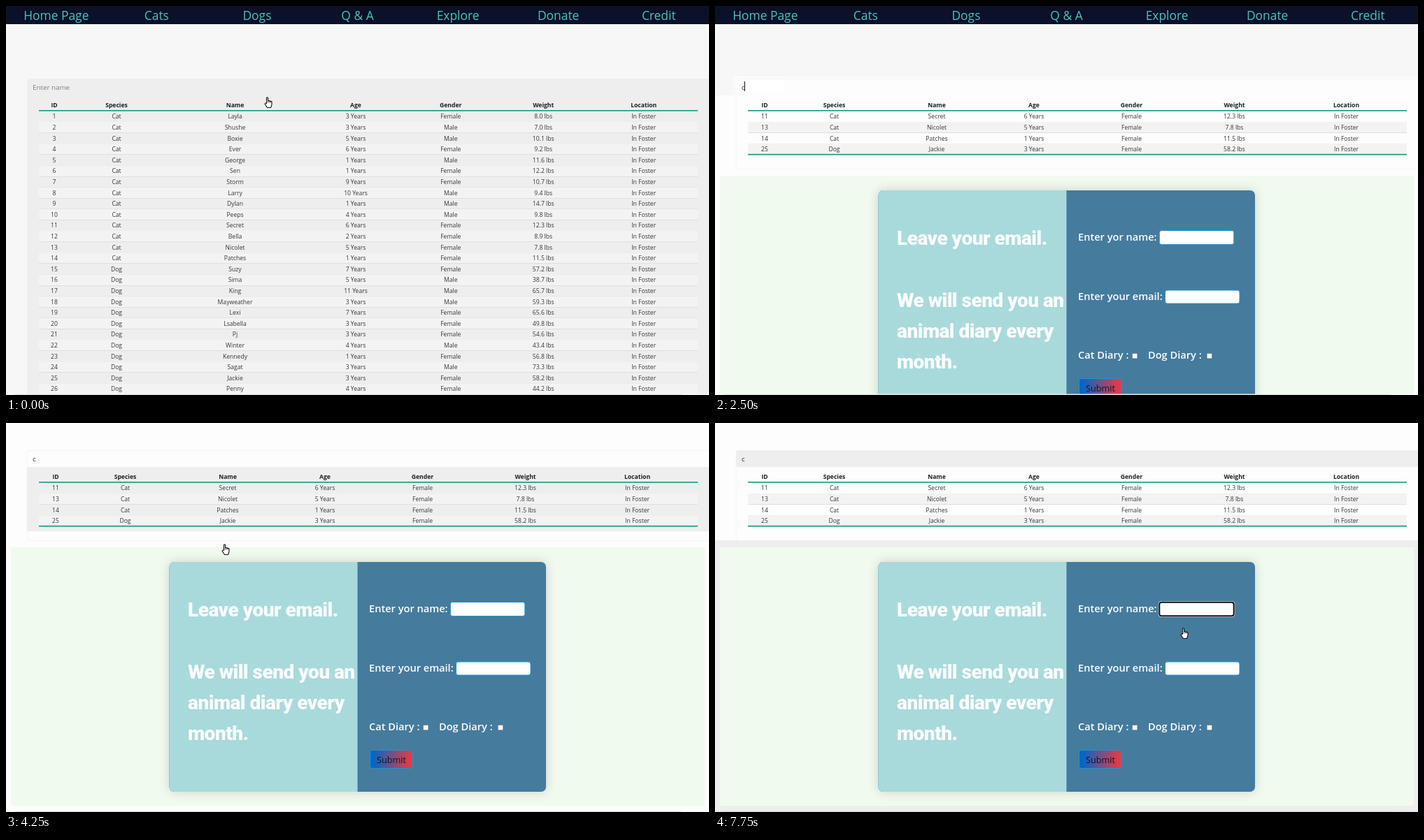
Recreate the animation shown at these times as an HTML page with a canvas. Size 1005 by 557 pixels, loop 8 s.

```html
<!DOCTYPE html>
<html lang="en">
<head>
<meta charset="utf-8">
<title>Pet table</title>
<style>
html, body { margin: 0; width: 1005px; height: 557px; overflow: hidden; background: #fdfdfd; }
canvas { display: block; }
</style>
</head>
<body>
<canvas id="stage" width="1005" height="557"></canvas>
<script>
const ctx = document.getElementById('stage').getContext('2d');
const LOOP = 8000, W = 1005, H = 557;
const SANS = '"Open Sans", "Noto Sans", sans-serif';
const GRAY = '#eeeeee', TEAL = '#159a84';

const NAV = ['Home Page', 'Cats', 'Dogs', 'Q & A', 'Explore', 'Donate', 'Credit'];
const HEADS = ['ID', 'Species', 'Name', 'Age', 'Gender', 'Weight', 'Location'];
const WIDE_COLS = [69, 158, 327.5, 500, 635.7, 768.2, 911.7];
const SHORT_COLS = [71, 170.5, 317, 456, 595.5, 742.5, 902.5];

// name, age, gender, weight
const PETS = `Layla 3 F 8.0,Shushe 3 M 7.0,Boxie 5 M 10.1,Ever 6 F 9.2,George 1 M 11.6,Sen 1 F 12.2,
Storm 9 F 10.7,Larry 10 M 9.4,Dylan 1 M 14.7,Peeps 4 M 9.8,Secret 6 F 12.3,Bella 2 F 8.9,
Nicolet 5 F 7.8,Patches 1 F 11.5,Suzy 7 F 57.2,Sima 5 M 38.7,King 11 M 65.7,Mayweather 3 M 59.3,
Lexi 7 F 65.6,Lsabella 3 F 49.8,Pj 3 F 54.6,Winter 4 M 43.4,Kennedy 1 F 56.8,Sagat 3 M 73.3,
Jackie 3 F 58.2,Penny 4 F 44.2`.split(',').map((line, i) => {
  const [name, age, sex, weight] = line.trim().split(' ');
  return [i + 1, i < 14 ? 'Cat' : 'Dog', name, age + ' Years',
    sex === 'F' ? 'Female' : 'Male', weight + ' lbs', 'In Foster'];
});
const MATCHES = PETS.filter(pet => pet[2].toLowerCase().includes('c'));

function rect(x, y, w, h, fill) {
  ctx.fillStyle = fill;
  ctx.fillRect(x, y, w, h);
}

function box(x, y, w, h, r, fill, stroke, line = 1) {
  ctx.beginPath();
  ctx.roundRect(x, y, w, h, r);
  if (fill) { ctx.fillStyle = fill; ctx.fill(); }
  if (stroke) { ctx.strokeStyle = stroke; ctx.lineWidth = line; ctx.stroke(); }
}

function text(str, x, y, size, color, weight = 400, align = 'left') {
  ctx.font = `${weight} ${size}px ${SANS}`;
  ctx.textAlign = align;
  ctx.fillStyle = color;
  ctx.fillText(str, x, y);
}

function slogan() {
  const lines = [['Leave your email.', 342], ['We will send you an', 430.5],
    ['animal diary every', 475], ['month.', 519]];
  ctx.save();
  ctx.fontStretch = 'condensed';
  ctx.letterSpacing = '-0.5px';
  ctx.textAlign = 'left';
  ctx.fillStyle = '#fbfdfd';
  let size = 35;
  do ctx.font = `900 ${size}px Roboto, sans-serif`;
  while (ctx.measureText(lines[1][0]).width > 240 && (size -= 0.5) > 20);
  for (const [str, y] of lines) ctx.fillText(str, 260, y);
  ctx.restore();
}

function nav() {
  rect(0, 0, W, 26, '#0a1128');
  NAV.forEach((label, i) =>
    text(label, (i + 0.5) * W / 7, 20, 17.4, '#4cc0bd', 400, 'center'));
}

function table(rows, cols, closed) {
  HEADS.forEach((head, i) => text(head, cols[i], 145.3, 8.6, '#1c1f23', 700, 'center'));
  rows.forEach((row, r) => {
    const top = 150.4 + r * 15.6;
    if (r % 2) rect(47, top, 942, 15.6, '#f3f3f3');
    rect(47, Math.round(top + 15.1), 942, 1, '#dfdfdf');
    row.forEach((cell, i) => text(cell, cols[i], top + 11, 8.6, '#33373b', 400, 'center'));
  });
  rect(47, 149, 942, 1.6, TEAL);
  if (closed) rect(47, 211.8, 942, 1.7, TEAL);
}

function form(focused) {
  ctx.save();
  ctx.shadowColor = 'rgba(0,0,0,.16)';
  ctx.shadowBlur = 16;
  box(233.5, 264, 538.5, 329, 7, '#457b9d');
  ctx.restore();
  box(233.5, 264, 269, 329, [7, 0, 0, 7], '#a8dadc');
  slogan();

  text('Enter yor name:', 519, 335.5, 14.6, '#fbfdfd', 600);
  text('Enter your email:', 519, 420.5, 14.6, '#fbfdfd', 600);
  text('Cat Diary :', 519, 505, 14.6, '#fbfdfd', 600);
  text('Dog Diary :', 619, 505, 14.6, '#fbfdfd', 600);
  if (focused) {
    box(633.8, 320.3, 109.4, 22.4, 4, '#fff');
    box(635.3, 321.8, 106.4, 19.4, 3, '#fff', '#101010', 2);
  } else {
    box(635.3, 321.5, 106.5, 20, 3, '#fff', '#1c97cf');
  }
  box(643.5, 407, 106.5, 19, 3, '#fff', '#1c97cf');
  for (const x of [596.5, 703.3]) box(x, 497.5, 7.2, 7.2, 1, '#fff', '#5f7f95', 0.6);

  const fill = ctx.createLinearGradient(520, 0, 581, 0);
  fill.addColorStop(0.08, '#0466c8');
  fill.addColorStop(0.92, '#e03a48');
  box(520.5, 533.5, 60.5, 26, 3, fill, '#1c97cf');
  text('Submit', 551, 552, 12.7, '#14151c', 400, 'center');
}

function hand(x, y) {
  ctx.save();
  ctx.translate(x, y);
  ctx.beginPath();
  ctx.moveTo(3, 9.5);
  ctx.lineTo(3, 1.6);
  ctx.quadraticCurveTo(4, 0, 5, 1.6);
  ctx.lineTo(5, 5.5);
  ctx.quadraticCurveTo(6.2, 4.8, 7, 6);
  ctx.quadraticCurveTo(8.2, 5.4, 8.9, 6.7);
  ctx.quadraticCurveTo(10.6, 6.2, 10.6, 8);
  ctx.lineTo(10.4, 11.5);
  ctx.lineTo(9, 15.5);
  ctx.lineTo(4, 15.5);
  ctx.lineTo(0.7, 10.6);
  ctx.quadraticCurveTo(0.5, 8.2, 3, 9.5);
  ctx.closePath();
  ctx.fillStyle = '#fff';
  ctx.fill();
  ctx.lineJoin = 'round';
  ctx.lineWidth = 1.1;
  ctx.strokeStyle = '#111';
  ctx.stroke();
  ctx.beginPath();
  for (const fx of [5, 7, 8.9]) { ctx.moveTo(fx, 6); ctx.lineTo(fx, 8.4); }
  ctx.lineWidth = 0.8;
  ctx.stroke();
  ctx.restore();
}

function fullPage(t) {
  rect(0, 0, W, H, '#f7f7f7');
  if (t < 250) {
    box(30, 104, 990, 500, 4, GRAY);
  } else {
    rect(26, 100, W, H, '#fbfbfb');
    if (t < 1250) box(30, 104, 990, 24, [4, 0, 0, 0], GRAY);
  }
  if (t >= 1000) rect(30, 105, 70, 19, '#fff');
  nav();
  table(PETS, WIDE_COLS, false);
}

function filteredPage(t) {
  const scrolled = t >= 4250;
  const framed = t >= 4500;
  rect(0, 0, W, H, '#fdfdfd');
  ctx.save();
  if (scrolled) ctx.translate(0, -65);
  else rect(0, 0, W, 128, '#f7f7f7');
  if (!scrolled) rect(26, 101, W, 27, '#fbfbfb');

  box(30, 104.5, 990, 129, 4, '#fdfdfd', '#f4f4f4');
  if (framed) box(30, 104, 990, 24, [4, 0, 0, 4], GRAY);
  else if (!scrolled) rect(30, 105, t < 4000 ? 70 : 290, 19, '#fff');
  if (t >= 3750 && !framed) rect(30, 128, W, 92, GRAY);
  if (framed) rect(0, 233, W, 400, GRAY);
  rect(7, 243, 992, 370, '#f1faee');
  if (!scrolled) nav();
  table(MATCHES, SHORT_COLS, true);
  form(t >= 5250);
  ctx.restore();
}

const within = (t, ...spans) => spans.some(([a, b]) => t >= a && t < b);

function draw(t) {
  if (t < 2500) fullPage(t);
  else filteredPage(t);
  rect(0, 555.5, W, 1.5, t >= 4500 ? '#e4e4e4' : '#f5f5f5');
  rect(12, 556, 954, 1, '#d8d8d8');

  if (t < 2250) text('Enter name', 38, 119.8, 9.8, '#7b7f83');
  else text('c', 38, t < 4250 ? 119.8 : 54.8, 9.8, '#26292c');

  if (within(t, [1000, 1500])) rect(38, 109, 1, 14, '#111');
  if (within(t, [2250, 3000], [3500, 4000])) rect(42, 108, 1, 14, '#111');
  if (within(t, [5250, 5750], [6250, 6750], [7250, 7750])) rect(642, 261, 1, 12, '#111');
  if (within(t, [5000, 7750])) rect(690, 276.5, 4, 1.2, '#222');

  if (t < 250) hand(369.5, 130);
  else if (within(t, [4000, 4500])) hand(308.5, 173);
  else if (within(t, [4500, 4750])) hand(523, 252);
  else if (within(t, [4750, 5000])) hand(662.5, 273);
  else if (t >= 7750) hand(665.5, 293);
}

const start = performance.now();
function tick() {
  draw((performance.now() - start) % LOOP);
  requestAnimationFrame(tick);
}
tick();
</script>
</body>
</html>
```
